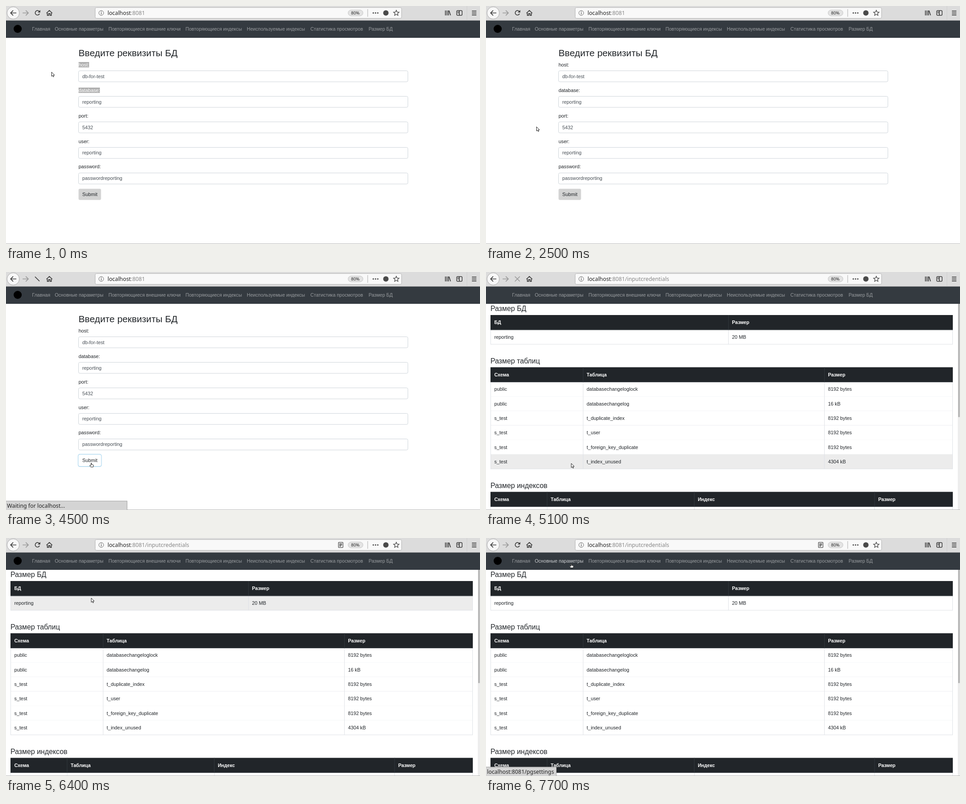
An HTML page that plays this animation: 1055x531 px, repeating every 8 s.

```html
<!DOCTYPE html>
<html lang="ru">
<head>
<meta charset="utf-8">
<title>DB report</title>
<style>
html, body { margin: 0; height: 100%; overflow: hidden; background: #fff; }
svg { display: block; width: 100%; height: 100%; }
text { font: 10.85px "Liberation Sans", Arial, sans-serif; fill: #212529; white-space: pre; }
.ui { font: 12.3px "Noto Sans", "Open Sans", sans-serif; fill: #222; }
.zoom { font-size: 9.7px; }
.dim { fill: #858585; }
.nav { font-size: 10.65px; fill: #999c9f; }
.nav.hover { fill: #ccced0; }
.title { font-size: 20.8px; }
.heading { font-size: 15.8px; }
.value { fill: #495057; }
.selected { fill: #fff; }
.head { font-size: 10.7px; font-weight: bold; fill: #fff; }
.icon { fill: none; stroke: #3a3a3a; stroke-width: 1.7; }
.gray { stroke: #999; }
</style>
</head>
<body>
<svg id="stage" viewBox="0 0 1055 531" preserveAspectRatio="none"></svg>
<script>
const LOOP = 8000, LEFT = 10, RIGHT = 1039;

const text = (x, y, s, cls = '', id = '') =>
  `<text x="${x}" y="${y}" class="${cls}" id="${id}">${s}</text>`;
const rect = (x, y, w, h, fill, more = '') =>
  `<rect x="${x}" y="${y}" width="${w}" height="${h}" fill="${fill}" ${more}/>`;
const icon = (d, cls = '', id = '') => `<path d="${d}" class="icon ${cls}" id="${id}"/>`;
const group = (id, ...parts) => `<g id="${id}">${parts.join('')}</g>`;

function toolbar() {
  return rect(0, 0, 1055, 32, '#dcdcdc') + rect(0, 31.5, 1055, 1, '#c4c4c4') +
    '<circle cx="16" cy="15.5" r="13.7" fill="#f7f7f7" stroke="#a8a8a8"/>' +
    icon('M23 15.5H10.5M16 9.8L10.3 15.5l5.7 5.7') +
    icon('M37 15.5h12M44 9.8l5.7 5.7-5.7 5.7', 'gray') +
    group('reload', icon('M74 12.2A5 5 0 1 0 74.6 17.2'),
      '<path d="M76.3 9v5.6h-5.6z" fill="#3a3a3a"/>') +
    icon('M64.5 10.5l10 10', '', 'slash') +
    icon('M64.3 10l11 11m0-11l-11 11', 'gray', 'cross') +
    icon('M90 16l6.5-6 6.5 6M92 15.5v5.3h3v-4h3v4h3v-5.3') +
    rect(198.5, 3.5, 682, 24, '#f9f9f9', 'rx="3" stroke="#b4b4b4"') +
    '<circle cx="212" cy="15.5" r="5.3" fill="none" stroke="#666"/>' +
    rect(211.4, 14.5, 1.3, 4, '#555') + rect(211.4, 12, 1.3, 1.4, '#555') +
    '<text class="ui" x="226" y="20">localhost<tspan class="dim">:8081<tspan id="path">/inputcredentials</tspan></tspan></text>' +
    group('reader', rect(740, 9.7, 10, 11.6, 'none', 'rx="1" stroke="#4a4a4a" stroke-width="1.3"'),
      icon('M742 13h6M742 15.5h6M742 18h4', '" stroke-width="1')) +
    rect(761.5, 9, 33, 13, '#e4e4e4', 'rx="6.5" stroke="#c4c4c4"') +
    text(768, 19.2, '80%', 'ui zoom') +
    rect(804.5, 7, 1, 17, '#aaa') +
    [817.5, 822.5, 827.5].map(x => `<circle cx="${x}" cy="15.5" r="1.6" fill="#4a4a4a"/>`).join('') +
    '<circle cx="845.5" cy="15.5" r="6" fill="#4a4a4a"/>' +
    '<path d="M868.7 9.4l1.8 4 4.3.4-3.3 2.9 1 4.3-3.8-2.3-3.8 2.3 1-4.3-3.3-2.9 4.3-.4z" fill="none" stroke="#4a4a4a" stroke-width="1.3"/>' +
    icon('M978 10v11M981.5 10v11M984.8 10v11M986 10.3l3.5 10.4') +
    rect(1003.2, 10.3, 12, 10.4, 'none', 'rx="2" stroke="#3a3a3a" stroke-width="1.5"') +
    icon('M1009 10v11M1005 13h2.5M1005 15.5h2.5') +
    rect(1025.5, 0, 1, 31, '#cdcdcd') +
    icon('M1037 11.3h10M1037 15.6h10M1037 19.9h10');
}

function navbar() {
  const items = [[58, 'Главная'], [108.5, 'Основные параметры'], [228, 'Повторяющиеся внешние ключи'],
    [399.5, 'Повторяющиеся индексы'], [536, 'Неиспользуемые индексы'],
    [677.5, 'Статистика просмотров'], [807, 'Размер БД']];
  return rect(0, 32, 1055, 39, '#343a40') +
    '<circle id="logo" cx="26" cy="51" r="9" fill="#000"/>' +
    items.map(([x, s], i) => text(x, 54.8, s, 'nav', 'nav' + i)).join('');
}

function form() {
  const fields = [['host:', 'db-for-test'], ['database:', 'reporting'], ['port:', '5432'],
    ['user:', 'reporting'], ['password:', 'passwordreporting']];
  return group('form', text(161.5, 112.4, 'Введите реквизиты БД', 'title'),
    group('selection', rect(161.5, 125, 23.5, 12, '#b0b0b0'), rect(161.5, 182, 47.5, 12, '#b0b0b0')),
    ...fields.map(([label, value], i) => {
      const y = 56.9 * i;
      return text(161.5, 134.8 + y, label, '', 'label' + i) +
        rect(161.5, Math.round(144 + y) + .5, 733, 24.6, '#fff', 'rx="3" stroke="#ced4da"') +
        text(169.7, 160.7 + y, value, 'value');
    }),
    rect(160.7, 406.7, 51.6, 27.4, '#fff', 'id="ring" rx="4" stroke="#bfe0f2" stroke-width="2"'),
    rect(161.5, 407.8, 50, 25, '#d3d3d3', 'id="button" rx="3"'),
    text(169.7, 424.2, 'Submit'));
}

// cols: [left edge, title]; the first row sits directly under the header
function table(title, y, cols, rows, id) {
  const step = 32.3, top = y + 33, bottom = top + step * rows.length;
  const cells = (row, base, cls) => row.map((s, i) => text(cols[i][0] + 8.4, base, s, cls)).join('');
  const line = (x, y0, y1, color) => rect(x, y0, 1, y1 - y0, color);
  return text(LEFT, y - 9, title, 'heading') +
    rows.map((row, i) => {
      const r = top + step * i;
      return rect(LEFT, r, RIGHT - LEFT, step, '#fff', `id="${id}${i}"`) +
        rect(LEFT, Math.round(r + step) - .3, RIGHT - LEFT, 1, '#dee2e6') + cells(row, r + 19.8);
    }).join('') +
    [...cols.map(c => c[0]), RIGHT - 1].map(x => line(x, top, bottom, '#dee2e6')).join('') +
    rect(LEFT, y, RIGHT - LEFT, 33.3, '#212529') +
    cols.slice(1).map(c => line(c[0], y, top, '#32383e')).join('') +
    rect(LEFT, top - 1, RIGHT - LEFT, 1.3, '#32383e') +
    cells(cols.map(c => c[1]), y + 20, 'head');
}

function report() {
  return group('report',
    table('Размер БД', 96, [[10, 'БД'], [539.2, 'Размер']], [['reporting', '20 MB']], 'base'),
    table('Размер таблиц', 212.5, [[10, 'Схема'], [215.7, 'Таблица'], [752.8, 'Размер']], [
      ['public', 'databasechangeloglock', '8192 bytes'],
      ['public', 'databasechangelog', '16 kB'],
      ['s_test', 't_duplicate_index', '8192 bytes'],
      ['s_test', 't_user', '8192 bytes'],
      ['s_test', 't_foreign_key_duplicate', '8192 bytes'],
      ['s_test', 't_index_unused', '4304 kB']], 'table'),
    table('Размер индексов', 490.5, [[10, 'Схема'], [135.5, 'Таблица'], [463, 'Индекс'], [864.5, 'Размер']],
      [['', '', '', '']], 'index'),
    rect(1050, 32, 5, 499, '#ededed'), rect(1051, 34, 3.5, 290, '#b4b4b4', 'rx="1.7"'));
}

const status = (id, width, s) => group(id,
  rect(-1, 511, width + .5, 21, '#d4d4d4', 'stroke="#a0a0a0"'), text(2.3, 526, s, 'ui'));

document.getElementById('stage').innerHTML = form() + report() + navbar() + toolbar() +
  rect(0, 530, 1055, 1, '#b5b5b5') +
  status('waiting', 270, 'Waiting for localhost...') +
  status('link', 157, 'localhost:8081/pgsettings') +
  group('cursor',
    '<path id="arrow" d="M.5.5v9.4l2.2-2 1.5 3.3 1.5-.7-1.4-3.2h2.8z" fill="#fff" stroke="#222"/>',
    '<path id="hand" d="M-.9 6V1.2q.8-1.1 1.6 0V4L4 4.8q1 .4.8 1.6L4 9.6H-1.3L-3.8 6.4q.6-1.2 1.7-.6z" fill="#fff" stroke="#222"/>');

const $ = id => document.getElementById(id);
const show = (id, on) => $(id).style.display = on ? '' : 'none';

// time, x, y of the pointer tip; it jumps from place to place
const pointer = [[0, 101, 147], [1100, 107, 161], [1200, 114, 181], [1300, 120, 203], [1400, 123, 220],
  [1700, 122, 234], [1800, 117, 252], [1900, 112, 264], [2500, 112, 269], [3800, 190, 425.5],
  [5100, 189.3, 426.5], [6400, 189.3, 133.5], [6700, 189.3, 119.3], [7000, 190, 58], [7400, 190, 57]];

function render(t) {
  const within = (from, to = LOOP) => t >= from && t < to;
  const [, x, y] = pointer.findLast(p => p[0] <= t);
  const hand = within(3800, 5100) || within(7000), loaded = within(5100);
  $('cursor').setAttribute('transform', `translate(${x} ${y})`);
  show('hand', hand);
  show('arrow', !hand);

  show('form', !loaded);
  show('report', loaded);
  show('path', loaded);
  show('logo', !within(5100, 5400));
  show('reader', within(5400));

  show('reload', !within(4500, 5400));
  $('reload').style.opacity = within(5400, 5800) ? .45 : 1;
  show('slash', within(4500, 5100));
  show('cross', within(5100, 5400));

  const selected = within(0, 2100);
  show('selection', selected);
  for (const i of [0, 1]) $('label' + i).classList.toggle('selected', selected);
  $('button').setAttribute('fill', within(3800) ? '#fff' : '#d3d3d3');
  $('button').setAttribute('stroke', within(3800, 4500) ? '#d3d3d3' : 'none');
  show('ring', within(4500));

  $('table5').setAttribute('fill', within(5100, 6400) ? '#ececec' : '#fff');
  $('base0').setAttribute('fill', within(6400, 7000) ? '#ececec' : '#fff');
  $('nav1').classList.toggle('hover', within(7000));
  show('waiting', within(4500, 5100));
  show('link', within(7400));
  $('link').style.opacity = within(7700) ? 1 : .85;
}

function tick() {
  render(performance.now() % LOOP);
  requestAnimationFrame(tick);
}
tick();
</script>
</body>
</html>
```
